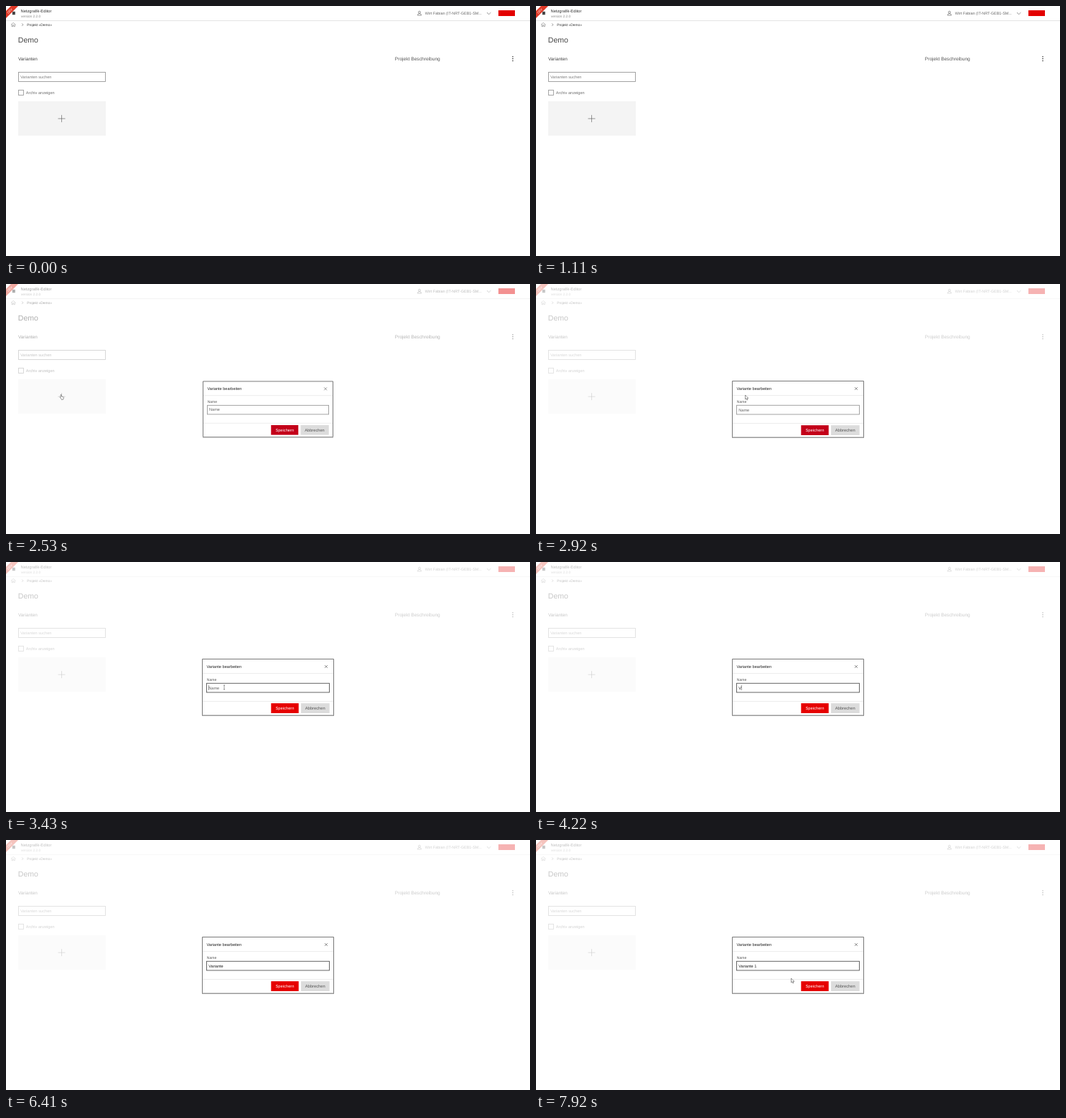
An HTML page that plays this animation: 730x349 px, repeating every 8000 ms.

```html
<!DOCTYPE html>
<html lang="de">
<head>
<meta charset="utf-8">
<title>Variante anlegen</title>
<style>
  html, body { margin: 0; width: 100%; height: 100%; overflow: hidden; background: #fff; }
  svg { display: block; width: 730px; height: 349px; }
  text { font-family: "Liberation Sans", Arial, sans-serif; text-rendering: geometricPrecision; white-space: pre; }
  .line { fill: none; stroke: #555; stroke-width: .6; }
  .box { fill: #fff; stroke: #999; stroke-width: .9; }
</style>
</head>
<body>
<svg viewBox="0 0 730 349">
  <g id="page">
    <rect x="8.8" y="7.8" width="4" height="4.400" fill="#444"/>
    <path d="M0 7L7 0H17L0 17Z" fill="#df3826"/>
    <text transform="translate(3.200 11) rotate(-45)" font-size="4.200" fill="#fff">DEV</text>
    <path d="M0 20.500H730" stroke="#e4e4e4"/>

    <g class="line">
      <path d="M573.400 13q0-2.500 2.600-2.500t2.600 2.500z"/>
      <circle cx="576" cy="8.700" r="1.500"/>
      <path d="M670 9l2.700 2.700L675.400 9"/>
      <path d="M7 26.200l3.200-2.900 3.200 2.900M8 25.500v3.200h1.500v-2h1.400v2h1.500v-3.200" stroke-width=".45"/>
      <path d="M22.200 24.400l1.700 1.700-1.700 1.700"/>
    </g>
    <rect x="686" y="6" width="23" height="8" fill="#e30000"/>

    <rect class="box" x="17.500" y="92.500" width="121" height="13"/>
    <rect class="box" x="17.400" y="117.400" width="7" height="7"/>
    <rect id="tile" x="17" y="133" width="122" height="48"/>
    <path class="line" d="M72.500 157.200h10M77.500 152.200v10"/>
    <g fill="#333">
      <circle cx="706" cy="70.700" r=".8"/><circle cx="706" cy="73.600" r=".8"/><circle cx="706" cy="76.500" r=".8"/>
    </g>
  </g>

  <rect id="veil" width="730" height="349" fill="#fff"/>

  <g id="dialog">
    <rect x="273" y="135" width="184" height="80" fill="#fff"/>
    <path d="M273.500 214V135.500H456.500V214" fill="none" stroke="#6a6a6a" stroke-width=".9"/>
    <path d="M273 214.200H457" stroke="#999" stroke-width="1.600"/>
    <path d="M274 155.500H456M274 194.500H456" stroke="#e8e8e8" stroke-width=".8"/>
    <path class="line" d="M444 144l4 4M448 144l-4 4" stroke-width=".8"/>
    <rect id="field" class="box" x="279.500" y="169.300" width="171" height="12.700"/>
    <rect id="save" x="369.300" y="197.200" width="38.400" height="13.800"/>
    <rect x="411" y="197.200" width="39.700" height="13.800" fill="#dcdcdc"/>
    <path id="caret" stroke="#222" stroke-width=".5"/>
  </g>

  <g id="cursor" fill="#fff" stroke="#444" stroke-width=".55" stroke-linejoin="round">
    <path id="arrow" d="M0 0v6l1.400-1.200 1 2.200 1-.5-1-2.100h1.900z"/>
    <path id="hand" d="M-.9.600q.8-.9 1.200.2v2.200l2.400.7q.8.300.6 1.200l-.6 2.300H.500L-1.600 4.400q.200-.8.7 0z"/>
    <path id="beam" d="M-1-3h2M0-3v6M-1 3h2" fill="none"/>
  </g>
</svg>
<script>
const LOOP = 8000;
const $ = id => document.getElementById(id);

function label(parent, x, y, size, str, fill = '#444', anchor = 'start') {
  const el = document.createElementNS('http://www.w3.org/2000/svg', 'text');
  const attrs = { x, y, fill, 'font-size': size, 'text-anchor': anchor };
  for (const k in attrs) el.setAttribute(k, attrs[k]);
  el.textContent = str;
  $(parent).append(el);
  return el;
}

label('page', 20.5, 9.2, 5.78, 'Netzgrafik-Editor', '#333');
label('page', 20.8, 16, 4.8, 'version 2.2.0', '#888');
label('page', 583.8, 12.1, 5.45, 'Wirt Fabian (IT-NRT-GEB1-SM...', '#666');
label('page', 29.2, 28, 4.85, 'Projekt «Demo»', '#333');
label('page', 16.8, 51, 10.5, 'Demo');
label('page', 17, 75.6, 6.4, 'Varianten');
label('page', 541.8, 75.6, 6.63, 'Projekt Beschreibung', '#555');
label('page', 20, 100.6, 5.65, 'Varianten suchen', '#808080');
label('page', 27.8, 122.8, 5.62, 'Archiv anzeigen', '#707070');

label('dialog', 279.5, 148, 5.62, 'Variante bearbeiten', '#222');
label('dialog', 279.8, 166.4, 5.05, 'Name', '#555');
label('dialog', 388.5, 206.3, 5.77, 'Speichern', '#fff', 'middle');
label('dialog', 430.7, 206.3, 5.77, 'Abbrechen', '#555', 'middle');
const value = label('dialog', 282.2, 177.5, 5.64, '');

// pointer: time, x, y, shape
const pointer = [
  [0, 0, 0, ''],
  [1710, 130, 199, 'arrow'], [1810, 121, 188, 'arrow'], [1910, 111, 175, 'hand'],
  [2010, 101, 163, 'hand'], [2110, 92, 154, 'hand'], [2210, 83, 154, 'hand'],
  [2310, 77, 154, 'hand'], [2620, 90, 154, 'arrow'], [2720, 150, 154, 'arrow'],
  [2820, 232, 154, 'arrow'], [2920, 291.5, 155, 'arrow'], [3020, 300, 166, 'arrow'],
  [3130, 304, 175, 'beam'], [4220, 0, 0, ''],
  [7720, 365.5, 203, 'arrow'], [7920, 355.5, 193, 'arrow']
];
const carets = [[0, 0], [3430, 1], [3930, 0], [4220, 1], [6410, 0], [6920, 1], [7720, 0]];
const keys = [4220, 4840, 4920, 5210, 5320, 5520, 5620, 5710, 5900, 7230];
const veils = [[0, 0], [2530, .57], [2620, .65], [2720, .7]];

const at = (rows, t) => rows.findLast(r => r[0] <= t);

function render(t) {
  const open = t >= 2530, focus = t >= 3430;

  $('tile').setAttribute('fill', t >= 1910 && !open ? '#f2f2f4' : '#f4f4f4');
  $('veil').setAttribute('opacity', at(veils, t)[1]);

  const scale = t < 2620 ? .989 : 1;
  $('dialog').setAttribute('visibility', open ? 'visible' : 'hidden');
  $('dialog').setAttribute('transform', `translate(365 175) scale(${scale}) translate(-365 -175)`);
  $('field').style.stroke = focus ? '#555' : '#999';
  $('save').setAttribute('fill', focus ? '#e60000' : '#c30019');

  const typed = 'Variante 1'.slice(0, keys.filter(k => k <= t).length);
  value.textContent = typed || 'Name';
  value.setAttribute('fill', typed ? '#222' : '#666');
  const end = 282.2 + (typed ? value.getComputedTextLength() : 0) + .3;
  $('caret').setAttribute('d', `M${end} 172v7`);
  $('caret').setAttribute('opacity', at(carets, t)[1]);

  const [, x, y, shape] = at(pointer, t);
  $('cursor').setAttribute('transform', `translate(${x} ${y})`);
  for (const s of ['arrow', 'hand', 'beam']) $(s).setAttribute('visibility', s === shape ? 'visible' : 'hidden');
}

const start = performance.now();
function tick() {
  render((performance.now() - start) % LOOP);
  requestAnimationFrame(tick);
}
tick();
</script>
</body>
</html>
```
